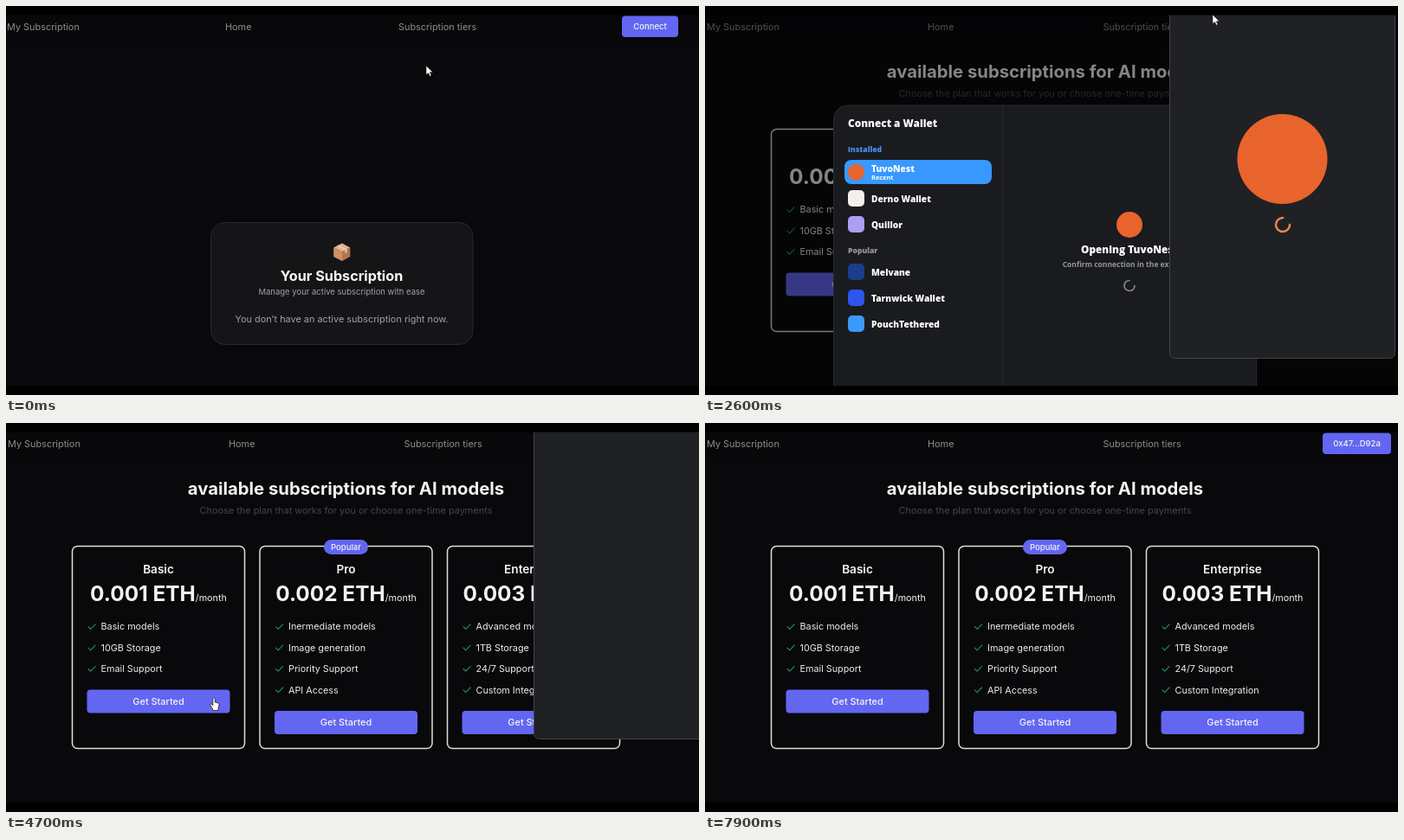
Recreate the animation shown at these times as an HTML page. Size 800 px wide and 450 px high, loop 8 s.

```html
<!DOCTYPE html>
<html lang="en">
<head>
<meta charset="utf-8">
<title>Subscription checkout</title>
<style>
  html, body { margin: 0; width: 100%; height: 100%; overflow: hidden; background: #000; }
  svg { display: block; width: 800px; height: 450px; font-family: Inter, sans-serif; }
  text { white-space: pre; }
  .w { font-family: "Open Sans", "Noto Sans", sans-serif; }
</style>
</head>
<body>
<svg id="stage" viewBox="0 0 800 450"></svg>
<script>
const LOOP = 8000;
const INDIGO = '#6366f1', BLUE = '#3898ff', FOX = '#e8642c', GREY = '#938b88';
const APP = 'TuvoNest';

// Markup helpers; text is placed by the middle of its capitals.
const rect = (x, y, w, h, r, fill, more = '') =>
  `<rect x="${x}" y="${y}" width="${w}" height="${h}" rx="${r}" fill="${fill}" ${more}/>`;
const circle = (x, y, r, fill, more = '') =>
  `<circle cx="${x}" cy="${y}" r="${r}" fill="${fill}" ${more}/>`;
const path = (d, stroke, width = 1, more = '') =>
  `<path d="${d}" fill="none" stroke="${stroke}" stroke-width="${width}" stroke-linecap="round" stroke-linejoin="round" ${more}/>`;
const text = (s, x, y, size, fill, weight = 400, anchor = 'start', cls = '') =>
  `<text class="${cls}" x="${x}" y="${y + size * 0.362}" font-size="${size}" fill="${fill}" font-weight="${weight}" text-anchor="${anchor}">${s}</text>`;
const mid = (s, x, y, size, fill, weight) => text(s, x, y, size, fill, weight, 'middle');
const wal = (s, x, y, size, fill, weight = 800, anchor) => text(s, x, y, size, fill, weight, anchor, 'w');
const group = (id, body, more = '') => `<g id="${id}" ${more}>${body}</g>`;
const arc = (id, x, y, r, color, width) =>
  `<g transform="translate(${x} ${y})"><g id="${id}">${path(`M0 ${-r}A${r} ${r} 0 1 1 ${-r} 0`, color, width)}</g></g>`;

function nav(xs) {
  return ['My Subscription', 'Home', 'Subscription tiers']
    .map((s, i) => text(s, xs[i], 24, 10.9, GREY)).join('');
}

function button(id, x, w, label) {
  return group(id, rect(x, 11.5, w, 24.5, 4, INDIGO) + mid(label, x + w / 2, 24, 9.5, '#f4f4fb', 500));
}

function emptyPage() {
  const box = '<path d="M388 274.5L397.3 279.5L388 284.5L378.2 279.5Z" fill="#e3b08a"/>' +
    '<path d="M378.2 279.5L388 284.5V295L378.2 290Z" fill="#cf9068"/>' +
    '<path d="M397.3 279.5L388 284.5V295L397.3 290Z" fill="#b3744f"/>' +
    '<path d="M382 277.6L391.5 282.6V286L393.5 285V281.6L384 276.6Z" fill="#efcbaa"/>';
  return nav([1, 253, 453]) + button('early', 711, 65, 'Connect') +
    rect(236.5, 250.5, 302.5, 141, 16, '#151517', 'stroke="#29292c"') + box +
    mid('Your Subscription', 387.5, 312.5, 16.2, '#fafafa', 700) +
    mid('Manage your active subscription with ease', 387.5, 330.5, 9.5, '#a0a0a8') +
    mid('You don’t have an active subscription right now.', 387.5, 362, 10.9, '#a0a0a8');
}

function plan(x, name, price, items, buttonY) {
  const c = x + 100;
  const rows = items.map((s, i) => {
    const y = 235.5 + i * 24.4;
    return path(`M${x + 19} ${y + .2}l2.7 2.7l5.4 -5.6`, '#1c9148', 1.2) + text(s, x + 33.5, y, 10.8, '#ededee');
  }).join('');
  return rect(x + .5, 142.5, 199, 234, 6, '#09090b', 'stroke="#dedfd9" stroke-width="1.5"') +
    mid(name, c, 169, 13.6, '#f2f2f2', 600) +
    `<text x="${c}" y="206" text-anchor="middle" font-size="24.4" font-weight="700" fill="#f2f2f2">${price} ETH<tspan font-size="10.8" font-weight="400">/month</tspan></text>` +
    rows + rect(x + 17.5, buttonY, 165, 27, 4, INDIGO) + mid('Get Started', c, buttonY + 13.5, 10.9, '#f4f4fb', 500);
}

function tiersPage() {
  return nav([2, 257, 459.5]) + button('connect', 719.5, 65, 'Connect') + button('account', 713, 79, '0x47...D92a') +
    mid('available subscriptions for AI models', 392.5, 76, 20.3, '#f2f2f2', 700) +
    mid('Choose the plan that works for you or choose one-time payments', 392.5, 101.5, 10.9, '#414654') +
    plan(76, 'Basic', '0.001', ['Basic models', '10GB Storage', 'Email Support'], 308.5) +
    plan(292.5, 'Pro', '0.002', ['Inermediate models', 'Image generation', 'Priority Support', 'API Access'], 333) +
    plan(509, 'Enterprise', '0.003', ['Advanced models', '1TB Storage', '24/7 Support', 'Custom Integration'], 333) +
    rect(367, 135, 51, 17, 8.5, INDIGO) + mid('Popular', 392.5, 143.5, 9.5, '#f4f4fb', 500);
}

function toast() {
  return rect(303, 17, 178, 30.5, 5, '#fff') + circle(316.5, 32, 6.8, '#ff4b4b') +
    path('M314 29.5l5 5M319 29.5l-5 5', '#fff', 1.4) + text('Please connect your wallet', 330, 32, 10.9, '#363636');
}

function walletList() {
  const rows = [
    ['Derno Wallet', 223, '#f3efed'], ['Quillor', 253, '#ab9ff2'], ['Melvane', 308, '#1c3c8c'],
    ['Tarnwick Wallet', 338, '#2f55ea'], ['PouchTethered', 368, '#3b99fc']
  ];
  return wal('Connect a Wallet', 165, 136, 11.8, '#fff') +
    wal('Installed', 165, 166, 8.6, '#4a8ff0') + wal('Popular', 165, 283, 8.6, '#96979c') +
    group('picked', rect(161, 178, 170, 28, 8, BLUE)) + circle(174.5, 192.3, 9.5, FOX) +
    wal(APP, 192, 188.3, 10.2, '#fff') +
    `<g id="recent">${wal('Recent', 192, 198.7, 7.4, 'currentColor', 700)}</g>` +
    rows.map(([s, y, fill]) => rect(165, y - 10, 19, 19, 5, fill) + wal(s, 192, y, 10.2, '#fff')).join('');
}

function about(title, lines, y) {
  return wal(title, 428, y, 8.7, '#fff') +
    lines.map((s, i) => wal(s, 428, y + 14.7 + i * 12.3, 8.5, '#95969b', 700)).join('');
}

function intro() {
  const assets = rect(384.7, 229.7, 32, 32, 7, '#15161d', 'stroke="#dcdde2" stroke-width="1.4"') +
    rect(388, 233, 12, 12, 3, '#1c3c8c') + rect(402, 233, 12, 12, 3, '#d9a066') +
    rect(388, 247, 12, 12, 3, '#a82c4e') + circle(408.5, 253.5, 7, '#7482ef');
  const login = rect(384.7, 302.7, 32, 32, 7, 'url(#pastel)', 'stroke="#dcdde2" stroke-width="1.4"') +
    rect(397, 308, 9, 21, 2, '#23242c');
  return wal('What is a Wallet?', 490.5, 172, 11.8, '#fff', 800, 'middle') + assets + login +
    about('A Home for your Digital Assets', ['Wallets are used to send, receive,', 'store, and display digital assets like', 'Ethereum and NFTs.'], 226) +
    about('A New Way to Log In', ['Instead of creating new accounts and', 'passwords on every website, just', 'connect your wallet.'], 299.5) +
    rect(454, 384, 72, 19, 9.5, BLUE) + wal('Get a Wallet', 490, 393.7, 8.7, '#fff', 800, 'middle') +
    wal('Learn More', 490, 420, 8.7, BLUE, 800, 'middle');
}

function opening() {
  return circle(490, 253, 15, FOX) + wal(`Opening ${APP}`, 490, 282, 11.8, '#fff', 800, 'middle') +
    wal('Confirm connection in the extension', 490, 298.7, 8.5, '#95969b', 700, 'middle') +
    arc('wait', 490, 323.5, 6, '#85868b', 1.7);
}

function modal() {
  return rect(148.5, 115, 488, 344, 16, '#1a1b1f', 'stroke="#292a2f"') + rect(343, 115, 1, 344, 0, '#292a2f') +
    walletList() + group('intro', intro()) + group('opening', opening()) +
    circle(616, 136, 9.5, '#35363b') + path('M613.2 133.2l5.6 5.6M618.8 133.2l-5.6 5.6', '#b0b1b5', 1.4);
}

// Popup parts are relative to its top left corner.
function titleBar() {
  return rect(0, 0, 261, 20, 4, '#1c1c20') + circle(9, 10.3, 5, FOX) + wal(APP, 18, 10.5, 7.7, '#f2f2f2', 400) +
    path('M179.5 10.5h6', '#e5e5e5') + path('M211 7.5h5.5v5.5h-5.5z', '#e5e5e5') +
    path('M241.8 7.8l5.4 5.4M247.2 7.8l-5.4 5.4', '#e5e5e5');
}

function pair(y, left, right, id) {
  return rect(11.5, y, 114, 32, 16, 'none', 'stroke="#343a78"') + mid(left, 68.5, y + 16, 9.8, '#555c9c') +
    rect(137, y, 112, 32, 16, '#202b7c') + group(id, mid(right, 193, y + 16, 9.8, '#b9bff5'));
}

function connecting() {
  return mid('Connecting', 130.5, 152.5, 11.9, '#fff', 600) + rect(76.5, 171.5, 108, 38, 19, '#141520') +
    circle(95, 190, 13, '#000') + circle(130.5, 190, 9, '#8b8ff0') + path('M126.8 190.2l2.6 2.6l4.8 -5.2', '#15161f', 1.3) +
    circle(165.5, 190.5, 12.5, FOX) + arc('busy', 193, 387, 5.5, '#7a84c0', 1.5);
}

function popup(id, body) {
  return group(id, rect(.5, .5, 260, 400, 6, '#202124', 'stroke="#424347"') + body);
}

const first = group('loading', circle(130.5, 172, 52, FOX) + arc('load', 131, 248, 8, '#e8884a', 2.5)) +
  group('ask', titleBar() +
    `<text x="20" y="354.5" font-size="9.7" fill="#fff">Only connect with sites you trust. <tspan fill="#8b8ff0">Learn more</tspan></text>` +
    pair(370.5, 'Back', 'Connect', 'go') + group('connecting', connecting()));
const second = group('confirm', titleBar() + pair(366, 'Cancel', 'Confirm', 'yes'));

const cursors =
  group('arrow', '<path d="M0 0V10.6L2.5 8.4L4.2 12.2L6 11.4L4.3 7.7H7.7Z" fill="#fff" stroke="#222" stroke-width=".6"/>') +
  group('hand', '<path d="M-1.2 .5Q0 -1 1.2 .5V5L5 6Q6.2 6.4 6 8L5 12V14.5H-1.5V12.5L-4.5 8Q-4.4 6.4 -2.8 7.3L-1.2 8.8Z" fill="#fff" stroke="#222" stroke-width=".8"/>') +
  group('stop', circle(0, 2, 4.6, '#fff', 'stroke="#c62f38" stroke-width="1.9"') + path('M-3 -1l6 6', '#c62f38', 1.8));

document.getElementById('stage').innerHTML =
  '<defs><linearGradient id="pastel" x2="1" y2="1"><stop stop-color="#8fe0df"/><stop offset=".5" stop-color="#b48be8"/><stop offset="1" stop-color="#ee9fc4"/></linearGradient></defs>' +
  rect(0, 0, 800, 450, 0, '#09090b') + rect(0, 10, 800, 33, 0, '#08080b') +
  group('empty', emptyPage()) + group('tiers', tiersPage()) +
  rect(0, 0, 800, 450, 0, '#000', 'id="shade"') + group('toast', toast()) + group('modal', modal()) +
  popup('popA', first) + popup('popB', second) + group('cursor', cursors) +
  rect(0, 0, 800, 10.5, 0, '#000') + rect(0, 439.5, 800, 10.5, 0, '#000');

const el = {};
document.querySelectorAll('[id]').forEach(n => { el[n.id] = n; });
const show = (id, on) => { el[id].style.display = on ? '' : 'none'; };
const move = (id, x, y, s = 1) => el[id].setAttribute('transform', `translate(${x} ${y}) scale(${s})`);
const span = (t, a, b) => Math.min(1, Math.max(0, (t - a) / (b - a)));
const smooth = p => p * p * (3 - 2 * p);
const lerp = (a, b, p) => a + (b - a) * p;

function bezier(x1, y1, x2, y2, x) {
  const at = (a, b, s) => 3 * a * s * (1 - s) ** 2 + 3 * b * s * s * (1 - s) + s ** 3;
  let lo = 0, hi = 1;
  for (let i = 0; i < 20; i++) {
    const s = (lo + hi) / 2;
    if (at(x1, x2, s) < x) lo = s; else hi = s;
  }
  return at(y1, y2, lo);
}

// time, x, y of the pointer tip
const TRAIL = [
  [0, 485, 69], [300, 500, 26], [450, 500, 26], [750, 600, 345], [850, 600, 345], [1080, 764, 32],
  [1350, 764, 32], [1700, 245, 195], [2250, 245, 195], [2550, 586, 10], [2650, 586, 10],
  [2850, 572, 36], [3120, 715, 417], [3500, 715, 417], [4150, 240, 318], [4750, 240, 318],
  [5000, 650, 12], [5300, 517, 24], [5650, 655, 390], [6000, 655, 390], [6400, 690, 330], [7000, 730, -20]
];

function pointer(t) {
  const i = TRAIL.findIndex(k => k[0] > t);
  if (i < 0) return TRAIL[TRAIL.length - 1].slice(1);
  const [a, b] = [TRAIL[i - 1], TRAIL[i]];
  const p = smooth(span(t, a[0], b[0]));
  return [lerp(a[1], b[1], p), lerp(a[2], b[2], p)];
}

function placePopup(id, p, from, to, scale = 1) {
  const [x, y, h] = from.map((v, i) => lerp(v, to[i], p));
  const frame = el[id].firstElementChild;
  frame.setAttribute('height', h - 1);
  move(id, x + 130.5 * (1 - scale), y + h / 2 * (1 - scale), scale);
}

function draw(t) {
  const connected = t >= 3500, open = t >= 1090 && !connected, asked = t >= 1900;
  show('empty', t < 450);
  show('tiers', t >= 450);
  show('connect', !connected);
  show('account', connected);

  const dim = open ? span(t, 1090, 1200) : 0;
  const enter = bezier(.21, 1.02, .73, 1, span(t, 850, 1100)), leave = span(t, 1700, 1850);
  show('toast', t >= 850 && t < 1850);
  move('toast', 0, -60 * (1 - enter) - 60 * leave);
  el.toast.style.opacity = enter * (1 - leave);
  el.toast.style.filter = `brightness(${1 - .32 * dim})`;

  show('shade', open);
  show('modal', open);
  el.shade.style.opacity = .45 * dim;
  // The intro is shorter than the waiting view, so the centred modal sits lower.
  const rest = asked ? 0 : 7.3;
  move('modal', 0, rest + 344 * (1 - bezier(.2, 1, .5, 1, span(t, 1090, 1290))));
  show('picked', asked);
  el.recent.style.color = asked ? '#fff' : '#4a8ff0';
  show('intro', !asked);
  show('opening', asked);

  show('popA', t >= 2450 && !connected);
  placePopup('popA', smooth(span(t, 2650, 2850)), [536, 5, 403], [522, 28, 430]);
  show('loading', t < 2850);
  show('ask', t >= 2850);
  el.popA.firstElementChild.setAttribute('fill', t < 2850 ? '#202124' : '#000');
  show('go', t < 3180);
  show('connecting', t >= 3180);

  const close = span(t, 5850, 6020);
  show('popB', t >= 4600 && close < 1);
  placePopup('popB', smooth(span(t, 5000, 5300)), [609, 5, 361], [476, 15, 411], 1 - .045 * close);
  el.popB.style.opacity = 1 - close;
  show('confirm', t >= 4950);
  el.popB.firstElementChild.setAttribute('fill', t < 4950 ? '#202124' : '#000');

  ['wait', 'load', 'busy'].forEach(id => el[id].setAttribute('transform', `rotate(${t * .45 % 360})`));

  const hand = (t > 230 && t < 450) || (t > 700 && t < 880) || (t > 1040 && t < 1090) ||
    (t > 1650 && t < 2280) || (t > 4050 && t < 4800);
  const stop = t >= 3180 && t < 3500;
  move('cursor', ...pointer(t));
  show('hand', hand);
  show('stop', stop);
  show('arrow', !hand && !stop);
}

const start = performance.now();
function tick() {
  draw((performance.now() - start) % LOOP);
  requestAnimationFrame(tick);
}
draw(0);
requestAnimationFrame(tick);
</script>
</body>
</html>
```
